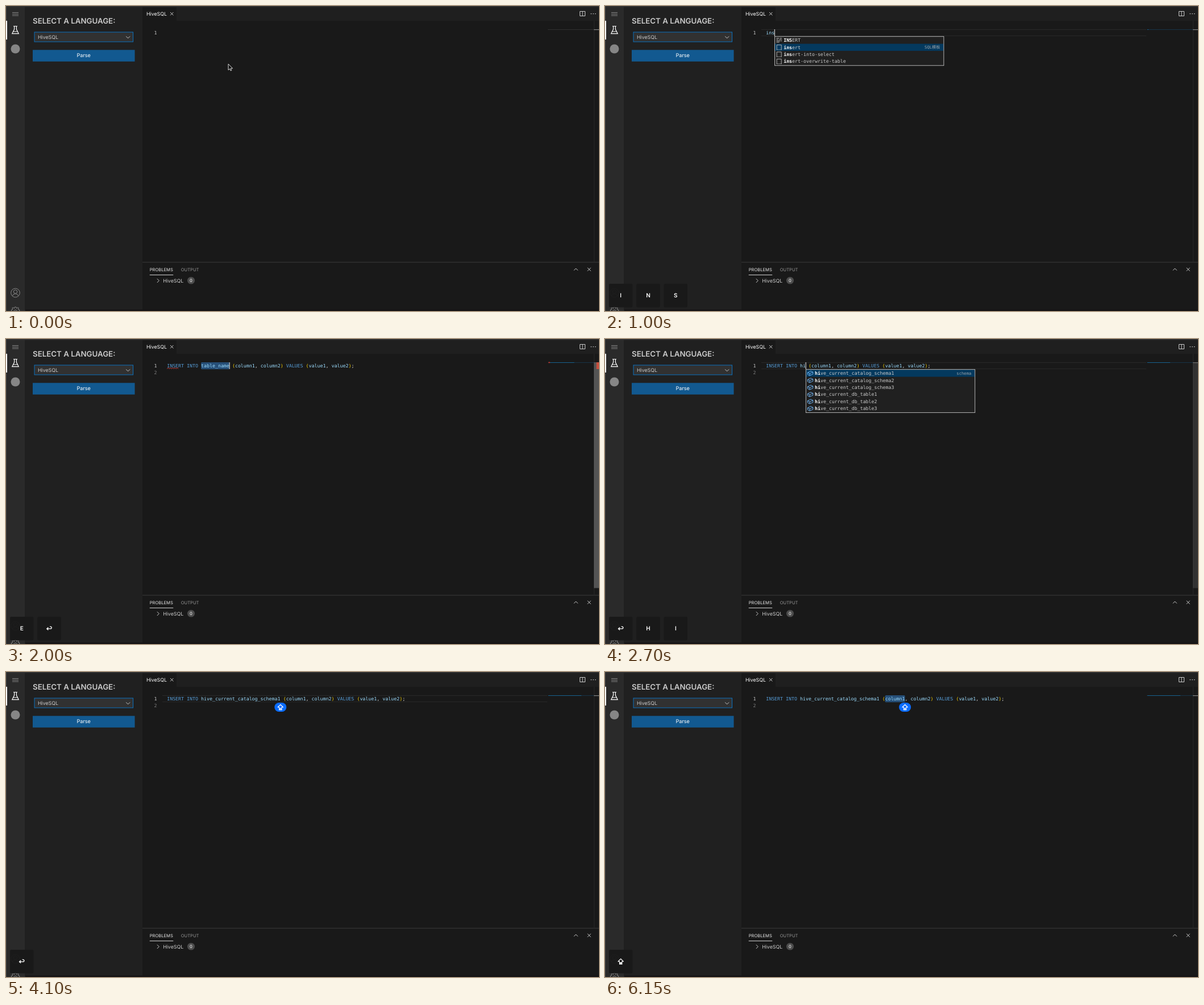
Animation of 1043x537 px, one loop 6200 ms. Source, as an HTML page:

```html
<!DOCTYPE html>
<html lang="en">
<head>
<meta charset="utf-8">
<title>SQL editor</title>
<style>
html, body { margin: 0; width: 100%; height: 100%; overflow: hidden; background: #191919; }
svg { display: block; width: 100%; height: 100%; text-rendering: geometricPrecision; }
text { font-family: Inter, "Liberation Sans", sans-serif; fill: #ccc; white-space: pre; }
.code { font: 8.285px "DejaVu Sans Mono", "Noto Sans CJK SC", monospace; }
.code .match { font-weight: 700; fill: #fff; }
.detail { font: 7.2px "DejaVu Sans Mono", "Noto Sans CJK SC", "Noto Sans CJK", monospace; fill: #9aa3aa; text-anchor: end; }
.key { font-size: 10px; font-weight: 600; fill: #fff; text-anchor: middle; }
.line { fill: none; stroke: #ccc; stroke-width: 1; }
.dim { stroke: #868686; }
</style>
</head>
<body>
<svg viewBox="0 0 1043 537" preserveAspectRatio="none">
  <defs>
    <path id="caps" d="M0-4.6 4.7 0H2.2V2H-2.2V0H-4.7ZM-2.2 3.3H2.2V4.8H-2.2Z" fill="none" stroke="#fff" stroke-width="1.1" stroke-linejoin="round"/>
    <path id="enter" d="M-4 .6H2.2Q4.2 .6 4.2-1.3T2.2-3.2H1M-1.6-1.8-4.2 .6-1.6 3" fill="none" stroke="#fff" stroke-width="1.3"/>
    <path id="tab" d="M-4.6 0H3M.6-2.4 3 0 .6 2.4M4.4-3V3" fill="none" stroke="#fff" stroke-width="1.3"/>
    <path id="cube" d="M-4.7-1.2 1-3.8 4.7-2V1.6L-1 4-4.7 2.2ZM-4.7-1.2-1 .6 4.7-2M-1 .6V4" fill="none" stroke="#75beff" stroke-width=".9" stroke-linejoin="round"/>
    <path id="snippet" d="M-4 4.2V-4.2H4V4.2M-4.4 4.2H-2M-1 4.2H1M2 4.2H4.4" fill="none" stroke="#bbb" stroke-width=".9"/>
    <path id="keyword" d="M-4.7-3.5H0M1.5-3.5H4.7M-4.7-1.2H-1.5M0-1.2H4.7M-4.7 1.2H2M3 1.2H4.7M-4.7 3.5H.5" fill="none" stroke="#bbb" stroke-width="1"/>
  </defs>

  <rect width="1043" height="537" fill="#191919"/>
  <rect x="240" width="803" height="26" fill="#1f1f1f"/>
  <rect x="240" y="2" width="60" height="24" fill="#191919"/>
  <rect x="33" width="207" height="537" fill="#202020"/>
  <rect width="33" height="537" fill="#2a2a2a"/>
  <rect width="1043" height="1.6" fill="#343434"/>
  <rect width="1" height="537" fill="#424242"/>
  <rect x="34" y="534.5" width="1009" height="2.5" fill="#151314"/>

  <rect y="26" width="2" height="33" fill="#fff"/>
  <path class="line dim" d="M11 11.5H22M11 14.2H22M11 16.9H22"/>
  <path class="line" style="stroke:#fff;stroke-width:1.2" d="M13 35.5H20M14.6 35.5V41L10.8 48.6H22.2L18.4 41V35.5M12.6 45H20.4"/>
  <circle cx="16.5" cy="75.5" r="8" fill="#868686"/>
  <g class="line dim">
    <circle cx="16.5" cy="505" r="7.8"/>
    <circle cx="16.5" cy="503" r="3.2"/>
    <path d="M11.3 510.6Q12.2 506.7 16.5 506.7T21.7 510.6"/>
    <path d="M9.5 537V535L12 534 10.8 531.8 12.6 530.8 14.6 532.4 15.4 530H17.8L18.6 532.4 20.6 530.8 22.4 531.8 21.2 534 23.7 535V537M13.8 537Q16.6 533 19.4 537"/>
  </g>

  <text x="47" y="31.2" font-size="13.3" font-weight="600">SELECT A LANGUAGE:</text>
  <rect x="50" y="46" width="173.5" height="17" fill="#313131" stroke="#0b70bd"/>
  <text x="56" y="58" font-size="8.8">HiveSQL</text>
  <path class="line" d="M211.2 53.4 214.6 56.8 218 53.4"/>
  <rect x="47" y="77.3" width="179.5" height="20.4" fill="#125990"/>
  <text x="136.7" y="90.3" font-size="9.1" text-anchor="middle" style="fill:#fff">Parse</text>

  <text x="247" y="17.2" font-size="8.8" style="fill:#fff">HiveSQL</text>
  <path class="line" d="M289 11 294.4 16.4M294.4 11 289 16.4M1009.5 9.5H1018.5V17.5H1009.5ZM1014 9.5V17.5"/>
  <path d="M1028.5 13.6h1.5M1032.2 13.6h1.5M1035.9 13.6h1.5" stroke="#ccc" stroke-width="1.4"/>

  <rect x="240" y="450.6" width="803" height="1" fill="#3b3b3b"/>
  <text x="252.7" y="466.6" font-size="7.6" style="fill:#e7e7e7">PROBLEMS</text>
  <text x="307.7" y="466.6" font-size="7.6" style="fill:#969696">OUTPUT</text>
  <rect x="252.7" y="473" width="41.5" height="1" fill="#d0d0d0"/>
  <path class="line" d="M265.8 480.2 269.2 483.6 265.8 487M999 465.5 1002.4 462 1005.8 465.5M1022.8 460.8 1028.6 466.6M1028.6 460.8 1022.8 466.6"/>
  <text x="276.2" y="486.8" font-size="8.8">HiveSQL</text>
  <rect x="319" y="477" width="13" height="12.6" rx="6.3" fill="#4d4d4d"/>
  <text x="325.5" y="486.2" font-size="7.6" text-anchor="middle" style="fill:#fff">0</text>

  <g id="live"></g>
</svg>
<script>
const LOOP = 6200, KEY_LIFE = 1100, LEFT = 283.2, CHAR = 4.988, ROW = 12.42;
const live = document.getElementById('live');

const insertItems = [['keyword', 'INSERT'], ['snippet', 'insert', 'SQL模板'],
  ['snippet', 'insert-into-select'], ['snippet', 'insert-overwrite-table']];
const hiveItems = ['catalog_schema', 'db_table'].flatMap(kind =>
  [1, 2, 3].map(n => ['cube', `hive_current_${kind}${n}`, 'schema']));

const statement = table => `INSERT INTO ${table} (column1, column2) VALUES (value1, value2);`;
const typed = (at, word) => ({ at, text: word, caret: word.length, items: insertItems, match: word.length, focus: 1 });
const naming = (at, word) => ({ at, text: statement(word), caret: 12 + word.length, items: hiveItems, match: word.length, focus: 0 });
const schema = statement('hive_current_catalog_schema1');

const steps = [
  { at: 0, text: '', caret: null },
  { at: 250, text: '', caret: 0 },
  typed(450, 'i'), typed(600, 'in'), typed(800, 'ins'), typed(1400, 'inse'),
  { at: 1750, text: statement('table_name'), caret: 22, select: 10 },
  naming(2150, 'h'), naming(2350, 'hi'), naming(2900, 'hiv'),
  { at: 3550, text: schema, caret: 40 },
  { at: 4200, text: schema, caret: 49, select: 7 }
];

const keys = [[450, 'I'], [600, 'N'], [800, 'S'], [1400, 'E'], [1750, '#enter'], [2150, 'H'],
  [2350, 'I'], [2900, 'V'], [3450, '#enter'], [4200, '#tab'], [5950, '#caps']];

const column = i => LEFT + i * CHAR;
const rect = (x, y, w, h, fill, extra = '') =>
  `<rect x="${x}" y="${y}" width="${w}" height="${h}" fill="${fill}" ${extra}/>`;
const use = (href, x, y) => `<use href="${href}" x="${x}" y="${y}"/>`;

function tokenColor(token) {
  if (/^(INSERT|INTO|VALUES)$/.test(token)) return '#569cd6';
  if (/[()]/.test(token)) return '#ffd700';
  return /\w/.test(token) ? '#9cdcfe' : '#d4d4d4';
}

function codeLine(text) {
  return [...text.matchAll(/\w+|[^\s\w]/g)].map(m =>
    `<text class="code" x="${column(m.index)}" y="50" style="fill:${tokenColor(m[0])}">${m[0]}</text>`).join('');
}

function lineNumber(n, y, color) {
  return `<text class="code" x="265.4" y="${y}" text-anchor="end" style="fill:${color}">${n}</text>`;
}

function suggestions({ items, match, focus, caret }) {
  const x = column(caret) + .3, top = 54.1;
  const rows = items.map(([icon, label, detail], i) => {
    const y = top + i * ROW, active = i === focus;
    return (active ? rect(x, y, 297, ROW, '#04395e') : '') +
      use('#' + icon, x + 7.7, y + 6.2) +
      `<text class="code" x="${x + 15.7}" y="${y + 9}"><tspan class="match">${label.slice(0, match)}</tspan>${label.slice(match)}</text>` +
      (active && detail ? `<text class="detail" x="${x + 291}" y="${y + 8.8}">${detail}</text>` : '');
  }).join('');
  const height = items.length * ROW + 1.4;
  return rect(x, top - .4, 297.4, height, '#202020') + rows +
    rect(x, top - .4, 297.4, height, 'none', 'stroke="#c4c4c4" stroke-width=".9"');
}

function minimap(text) {
  return rect(953, 41, 81, 1, text ? '#173347' : '#303030') +
    (text ? rect(954, 41, Math.max(2, text.length * .69), 1, '#17618f') : '') +
    rect(1034, 41, 9, 1.2, '#858585');
}

function scrollbar(t) {
  if (t < 1750 || t > 3050) return '';
  const opacity = Math.min(1, (3050 - t) / 800);
  return rect(1034, 41, 9, 397.5, '#545454', `opacity="${opacity.toFixed(3)}"`);
}

function squiggle() {
  let path = `M${LEFT} 52.4`;
  for (let i = 1; i <= 10; i++) path += `L${LEFT + i * 2} ${i % 2 ? 50.8 : 52.4}`;
  return `<path d="${path}" fill="none" stroke="#f14c4c" stroke-width=".8"/>` +
    rect(954, 40.6, 3, 1.6, '#c33a35') + rect(1038.5, 41, 4.5, 12, '#c8503f');
}

function keycaps(t) {
  return keys.filter(([at]) => t >= at && t < at + KEY_LIFE).slice(-3).map(([, key], i) => {
    const x = 7 + i * 48.3;
    return rect(x, 489, 41.4, 41.4, '#191919', 'rx="2" opacity=".95"') +
      (key[0] === '#' ? use(key, x + 20.7, 509.6)
        : `<text class="key" x="${x + 20.7}" y="513.4">${key}</text>`);
  }).join('');
}

function capsBadge(caret) {
  const x = column(caret);
  return rect(x - 10.5, 54, 21, 16, '#0a6cff', 'rx="8"') + use('#caps', x, 62);
}

function pointer() {
  return '<path d="M391 102V112.8L393.5 110.5 395.1 114 396.7 113.3 395.2 109.9H398.6Z" fill="#111" stroke="#eee" stroke-width=".9"/>';
}

function scene(t) {
  const step = steps.findLast(s => t >= s.at);
  const { text, caret, select, items } = step;
  const focused = caret !== null;
  const caretOn = focused && (t - step.at) % 1000 < 500;
  let out = rect(1034, 26, .8, 424.6, '#2a2a2a') + minimap(text) + scrollbar(t);
  if (focused && !select) out += rect(275, 41, 677, .9, '#2b2b2b') + rect(275, 52.2, 677, .9, '#2b2b2b');
  if (select) out += rect(column(caret - select), 41, select * CHAR, 12.2, '#264f78', 'rx="1.5"');
  out += lineNumber(1, 50, '#c6c6c6') + (t >= 1750 ? lineNumber(2, 62.4, '#7d7d7d') : '') + codeLine(text);
  if (t >= 1800 && t < 2350) out += squiggle();
  if (caretOn) out += rect(column(caret) - .4, 41, 1.2, 12, '#d0d0d0');
  if (items) out += suggestions(step);
  if (t >= 3300) out += capsBadge(caret);
  if (t < 450) out += pointer();
  return out + keycaps(t);
}

const start = performance.now();
let shown = '';
function draw() {
  const next = scene((performance.now() - start) % LOOP);
  if (next !== shown) live.innerHTML = shown = next;
  requestAnimationFrame(draw);
}
draw();
</script>
</body>
</html>
```
